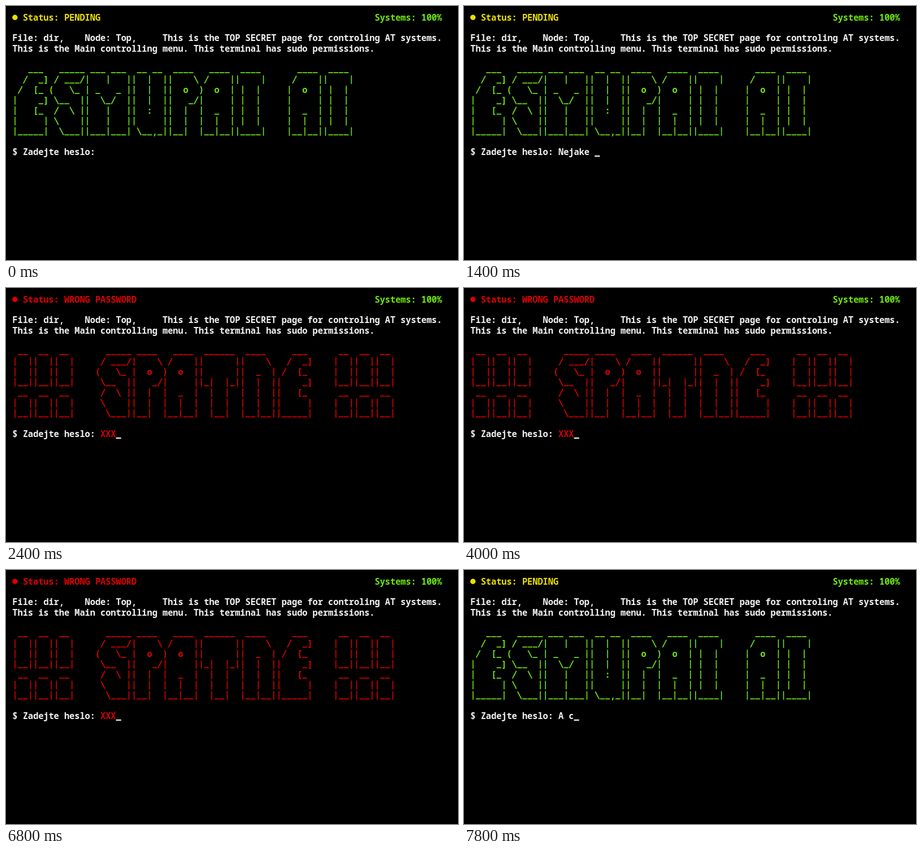
An HTML page with a canvas for the animation above (8000 ms loop, 800 by 450 pixels).

```html
<!DOCTYPE html>
<html lang="cs">
<head>
<meta charset="utf-8">
<title>Terminal</title>
<style>
html, body { margin: 0; width: 100%; height: 100%; overflow: hidden; background: #000; }
canvas { display: block; }
</style>
</head>
<body>
<canvas id="screen" width="800" height="450"></canvas>
<script>
const ctx = document.getElementById('screen').getContext('2d');
const LOOP = 8000, WRONG_AT = 2400, RESET_AT = 7200, KEY_MS = 183;
const CELL_W = 9.16, CELL_H = 18.36, LEFT = 11.4, TOP = 20.3;
const WHITE = '#f2f2f2', GREEN = '#6ee612', YELLOW = '#ece000', RED = '#dc0000';

const glyph = text => text.split('\n').slice(1);
const LETTERS = {
  '!': glyph(String.raw`
 __
|  |
|  |
|__|
 __
|  |
|__|`),
  A: glyph(String.raw`
  ____
 /    |
|  o  |
|     |
|  _  |
|  |  |
|__|__|`),
  E: glyph(String.raw`
   ___
  /  _]
 /  [_
|    _]
|   [_
|     |
|_____|`),
  I: glyph(String.raw`
 ____
|    |
 |  |
 |  |
 |  |
 |  |
|____|`),
  M: glyph(String.raw`
 ___ ___
|   |   |
| _   _ |
|  \_/  |
|   |   |
|   |   |
|___|___|`),
  N: glyph(String.raw`
 ____
|    \
|  _  |
|  |  |
|  |  |
|  |  |
|__|__|`),
  P: glyph(String.raw`
 ____
|    \
|  o  )
|   _/
|  |
|  |
|__|`),
  S: glyph(String.raw`
  _____
 / ___/
(   \_
 \__  |
 /  \ |
 \    |
  \___|`),
  T: glyph(String.raw`
 ______
|      |
|      |
|_|  |_|
  |  |
  |  |
  |__|`),
  U: glyph(String.raw`
 __ __
|  |  |
|  |  |
|  |  |
|  :  |
|     |
 \__,_|`)
};

// Places [column, word] pairs; a cell that is already taken keeps its character.
function banner(...words) {
  const rows = Array.from({ length: 7 }, () => Array(76).fill(' '));
  for (const [start, word] of words) {
    let col = start;
    [...word].forEach((letter, i) => {
      const lines = LETTERS[letter];
      lines.forEach((line, r) => [...line].forEach((ch, c) => {
        if (rows[r][col + c] === ' ') rows[r][col + c] = ch;
      }));
      col += Math.max(...lines.map(line => line.length));
      if (letter + word[i + 1] === 'PA') col--;
    });
  }
  return rows.map(row => row.join(''));
}

const TITLE = banner([0, 'ESMUPAI'], [53, 'AI']);
const ERROR = banner([0, '!!!'], [16, 'SPATNE'], [62, '!!!']);

function slash(x, y, dir) {
  ctx.beginPath();
  ctx.moveTo(x - 3.5 * dir, y + 6.6);
  ctx.lineTo(x + 3.5 * dir, y - 6.8);
  ctx.stroke();
}

function drawChar(ch, col, row) {
  const x = LEFT + (col + 0.5) * CELL_W, y = TOP + row * CELL_H;
  if (ch === '_') ctx.fillRect(x - 4.2, y + 5.2, 8.4, 1.7);
  else if (ch === '|') ctx.fillRect(x - 0.8, y - 7.6, 1.6, 15.2);
  else if (ch === '/') slash(x, y, 1);
  else if (ch === '\\') slash(x, y, -1);
  else if (ch !== ' ') ctx.fillText(ch, x, y + 5.4);
}

function print(text, col, row, color) {
  ctx.fillStyle = ctx.strokeStyle = color;
  [...text].forEach((ch, i) => drawChar(ch, col + i, row));
}

function draw(t) {
  const wrong = t >= WRONG_AT && t < RESET_AT;
  const statusColor = wrong ? RED : YELLOW;
  const [password, since] = t < RESET_AT ? ['Nejake heslo', 0] : ['A co ted', RESET_AT];
  const typed = wrong ? 'XXX' : password.slice(0, Math.floor((t - since) / KEY_MS));

  ctx.fillStyle = '#000';
  ctx.fillRect(0, 0, 800, 450);
  ctx.font = '600 15.5px "Noto Sans Mono", monospace';
  ctx.textAlign = 'center';
  ctx.lineWidth = 1.7;

  ctx.fillStyle = statusColor;
  ctx.beginPath();
  ctx.arc(15.8, 20.2, 4.7, 0, Math.PI * 2);
  ctx.fill();
  print('Status: ' + (wrong ? 'WRONG PASSWORD' : 'PENDING'), 2, 0, statusColor);
  print('Systems: 100%', 70, 0, GREEN);
  print('File: dir,    Node: Top,     This is the TOP SECRET page for controling AT systems.', 0, 2, WHITE);
  print('This is the Main controlling menu. This terminal has sudo permissions.', 0, 3, WHITE);
  (wrong ? ERROR : TITLE).forEach((line, i) => print(line, 0, 5 + i, wrong ? RED : GREEN));
  print('$ Zadejte heslo:', 0, 13, WHITE);
  print(typed, 17, 13, wrong ? RED : WHITE);
  if (typed) {
    ctx.fillStyle = WHITE;
    ctx.fillRect(LEFT + (17 + typed.length) * CELL_W, 264.8, CELL_W, 2.2);
  }
}

const startTime = performance.now();
function tick() {
  draw((performance.now() - startTime) % LOOP);
  requestAnimationFrame(tick);
}
tick();
</script>
</body>
</html>
```
